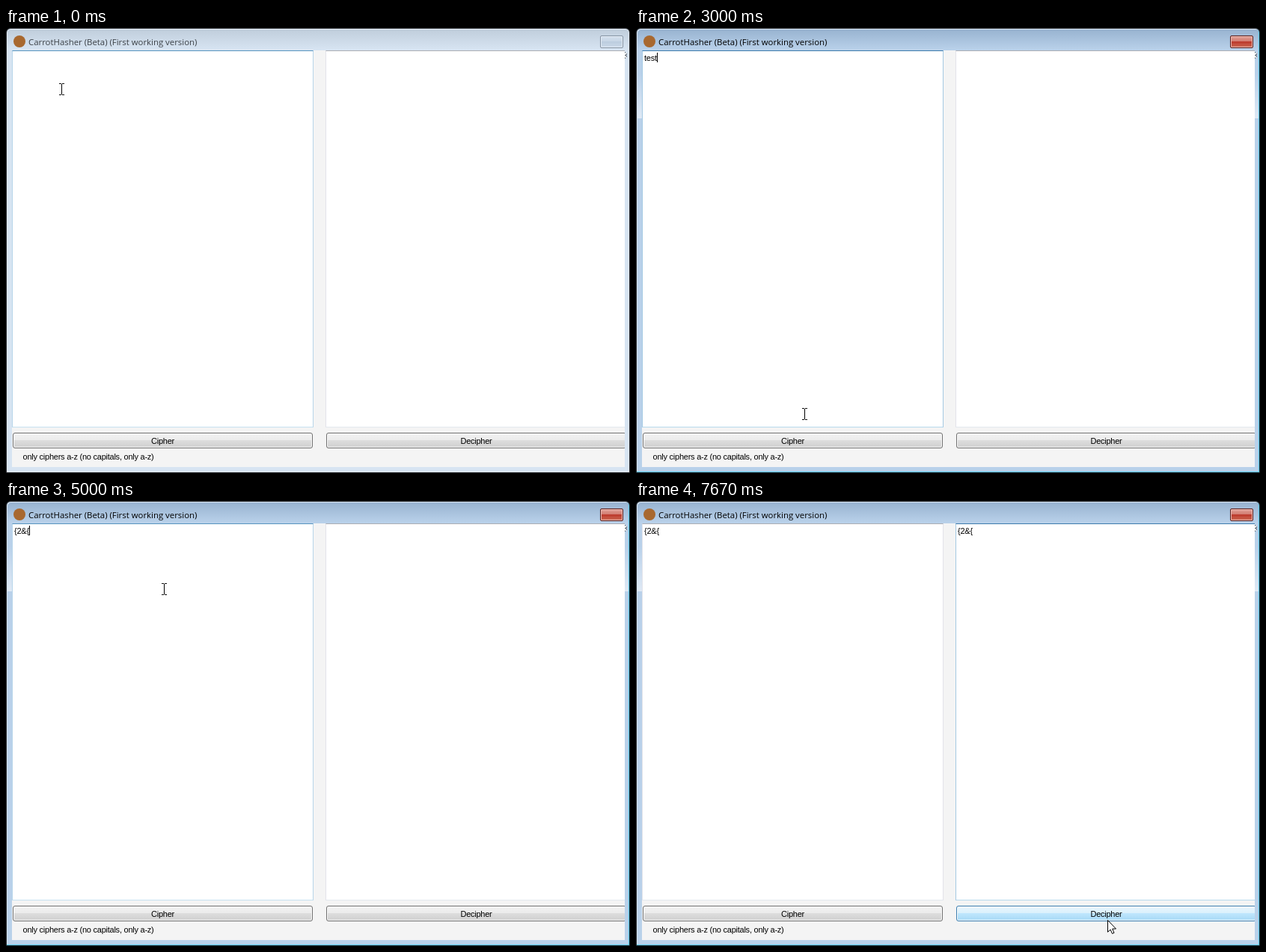
Animation of 834 by 596 pixels, one loop 8000 ms. Source, as an HTML page:

```html
<!DOCTYPE html>
<html lang="en">
<head>
<meta charset="utf-8">
<title>Cipher window</title>
<style>
  html, body { margin: 0; width: 100%; height: 100%; overflow: hidden; background: #000; }
  #stage { position: relative; width: 834px; height: 596px; overflow: hidden; }
  #stage div, #stage svg { position: absolute; box-sizing: border-box; white-space: pre; }
  #frame {
    inset: 0; border: 1px solid #23272c; border-radius: 6px 6px 0 0;
    background: linear-gradient(#bfcddb, #d7e4f2 28px);
    box-shadow: inset 0 0 0 1px #e9f0f8;
  }
  .active #frame {
    background: linear-gradient(#99b4d1 2px, #b9d1ea 28px, #b9d1ea 60px, #dfe9f5 120px, #b9d1ea 120px);
    box-shadow: inset -1px -1px #5cd2f2, inset 1px 1px #dbe8f5;
  }
  #icon { left: 10px; top: 10px; width: 16px; height: 16px; border-radius: 50%; background: #a8682f; }
  #title { left: 30px; top: 10px; font: 11.4px/17px "Open Sans", sans-serif; color: #3c4147; }
  .active #title { color: #000; }
  #close {
    left: 794px; top: 10px; width: 31px; height: 17px; border: 1px solid #8593a3; border-radius: 2px;
    background: linear-gradient(#d3dfec, #c6d5e5 50%, #bccddf 50%, #cbd9e8);
    box-shadow: inset 0 0 0 1px #e4edf6;
  }
  .active #close {
    border-color: #5a1e1c;
    background: linear-gradient(#e2a49b, #d27b70 45%, #bc392c 50%, #cd6a55);
    box-shadow: inset 0 0 0 1px #ecbab2;
  }
  #client {
    left: 8px; top: 30px; width: 819px; height: 558px; overflow: hidden; background: #f4f4f4;
    font: 11px/13px "Liberation Sans", Arial, sans-serif; letter-spacing: -.24px; color: #000;
  }
  .box { top: 0; width: 403px; height: 505px; background: #fff; border: 1px solid; border-color: #abadb3 #e2e3ea #e3e9ef; }
  .box.fade { border-color: #86a2ba #d0dde9 #d9e6f0; }
  .box.hot { border-color: #5794bf #b7d5ea #c7e2f1; }
  .box.focus { border-color: #3d7bad #a4c9e3 #b7d9ed; }
  .box span { position: absolute; left: 2px; top: 3px; height: 13px; }
  .box span.selected { background: #39f; color: #fff; }
  .button {
    top: 512px; width: 401px; height: 21px; line-height: 20px; text-align: center;
    border: 1px solid #707070; border-radius: 3px;
    background: linear-gradient(#f2f2f2, #ebebeb 50%, #ddd 50%, #cfcfcf);
    box-shadow: inset 0 0 0 1px #fafafa;
  }
  .button.hot {
    border-color: #3c7fb1;
    background: linear-gradient(#eaf6fd, #d9f0fc 50%, #bee6fd 50%, #a7d9f5);
  }
  .button.focus { border-color: #3c7fb1; box-shadow: inset 0 0 0 1px #8fd8f6; }
  #hint { left: 14.5px; top: 538px; }
  #caret { top: 33px; width: 1px; height: 13px; background: #000; }
  #caret.inverted { background: #c60; }
  #pointer { left: 0; top: 0; overflow: visible; }
</style>
</head>
<body>
<div id="stage">
  <div id="frame"></div>
  <div id="icon"></div>
  <div id="title">CarrotHasher (Beta) (First working version)</div>
  <div id="close">
    <svg width="29" height="15" fill="none">
      <path d="M11 4.5L18 10.5M18 4.5L11 10.5" stroke="#4b5560" stroke-width="4"/>
      <path d="M11 4.5L18 10.5M18 4.5L11 10.5" stroke="#fff" stroke-width="2"/>
    </svg>
  </div>
  <div id="client">
    <div class="box" id="leftBox" style="left:0"><span id="leftText"></span></div>
    <div class="box" id="rightBox" style="left:419px"><span id="rightText"></span></div>
    <div class="button" id="cipher" style="left:1px">Cipher</div>
    <div class="button" id="decipher" style="left:420px">Decipher</div>
    <div id="hint">only ciphers a-z (no capitals, only a-z)</div>
  </div>
  <div id="caret"></div>
  <svg id="pointer" width="1" height="1">
    <path id="beam" d="M-3-8h3v1h1v-1h3v1h-3v14h3v1h-3v-1h-1v1h-3v-1h3v-14h-3z" shape-rendering="crispEdges"/>
    <path id="arrow" d="M.5.5V16.3L4.1 13L6.5 18.4L9 17.4L6.7 12H11.5Z" fill="#fff" stroke="#000"/>
  </svg>
</div>
<script>
const LOOP = 8000;
const CODE = '{2&{';
const el = Object.fromEntries([...document.querySelectorAll('[id]')].map(e => [e.id, e]));

const start = {
  active: false, caret: 0, selected: false, shape: 'beam', at: [74, 82],
  leftText: '', rightText: '', leftBox: 'hot', rightBox: '', cipher: '', decipher: ''
};

// Each step lists only what changes; caret 0 and shape '' mean hidden.
const steps = [
  [0, {}],
  [330, { active: true, caret: 11, leftBox: 'focus', at: [75, 82] }],
  [1000, { caret: 0 }],
  [1330, { caret: 11 }],
  [1670, { leftText: 't', caret: 13, shape: '' }],
  [2000, { leftText: 'te', caret: 20 }],
  [2330, { leftText: 'tes', caret: 25, shape: 'beam', at: [76, 87] }],
  [2670, { at: [143, 220] }],
  [3000, { leftText: 'test', caret: 28, at: [225, 517] }],
  [3330, { caret: 0, cipher: 'hot', shape: 'arrow', at: [219, 545] }],
  [3670, { at: [219, 548] }],
  [4000, { leftText: CODE, leftBox: 'fade' }],
  [4330, { cipher: 'focus', shape: 'beam', at: [215, 468] }],
  [4670, { leftBox: 'hot', at: [213, 250] }],
  [5000, { caret: 31, cipher: '', at: [211, 118] }],
  [5330, { caret: 0, selected: true, leftBox: 'focus', shape: '' }],
  [5670, { caret: 11 }],
  [6000, { rightBox: 'hot', shape: 'beam', at: [607, 150] }],
  [6330, { caret: 430, selected: false, leftBox: 'fade', rightBox: 'focus' }],
  [6670, { leftBox: '', at: [541, 146] }],
  [7000, { rightText: CODE, caret: 450, at: [560, 203] }],
  [7330, { shape: 'arrow', at: [632, 537] }],
  [7670, { caret: 0, decipher: 'hot', at: [630, 561] }]
];

let state = start;
const timeline = steps.map(([time, change]) => ({ time, state: state = { ...state, ...change } }));

function draw(s) {
  el.stage.classList.toggle('active', s.active);
  for (const id of ['leftText', 'rightText']) el[id].textContent = s[id];
  for (const id of ['leftBox', 'rightBox']) el[id].className = 'box ' + s[id];
  for (const id of ['cipher', 'decipher']) el[id].className = 'button ' + s[id];
  for (const id of ['beam', 'arrow']) el[id].style.display = s.shape === id ? '' : 'none';
  el.leftText.className = s.selected ? 'selected' : '';
  el.caret.className = s.selected ? 'inverted' : '';
  el.caret.style.display = s.caret ? '' : 'none';
  el.caret.style.left = s.caret + 'px';
  el.pointer.style.transform = `translate(${s.at[0]}px, ${s.at[1]}px)`;
}

let shown = null;
function tick() {
  const time = performance.now() % LOOP;
  const current = timeline.findLast(step => step.time <= time);
  if (current !== shown) draw((shown = current).state);
  requestAnimationFrame(tick);
}
tick();
</script>
</body>
</html>
```
